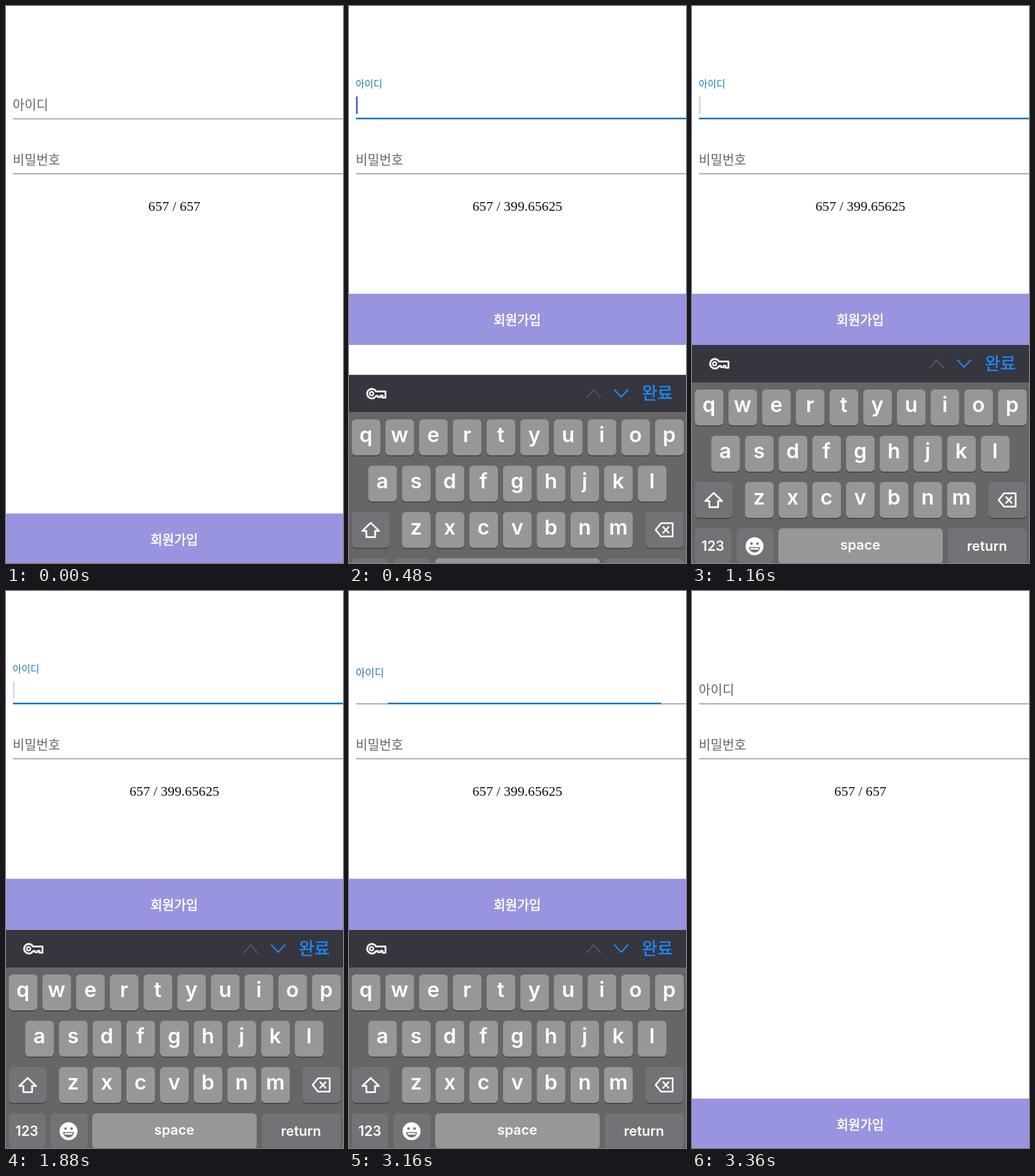
These frames come from a looping animation (582x963 px, 4.04 s). An HTML page with a canvas:

```html
<!DOCTYPE html>
<html lang="ko">
<head>
<meta charset="utf-8">
<style>
html, body { margin: 0; width: 100%; height: 100%; overflow: hidden; background: #fff; }
canvas { display: block; width: 582px; height: 963px; }
</style>
</head>
<body>
<canvas id="stage" width="582" height="963"></canvas>
<script>
const ctx = document.getElementById('stage').getContext('2d');
const LOOP = 4040;
const FOCUS = 226, BLUR = 3150;
const KEYBOARD_IN = 271.5, KEYBOARD_OUT = 3168.2;
const RESIZE_UP = 345, RESIZE_DOWN = 3300;
const KEYBOARD_TOP = 586, KEYBOARD_TRAVEL = 491;
const KOREAN = '"Noto Sans CJK KR", "Noto Sans CJK", sans-serif';
const LATIN = 'Inter, sans-serif';
const KEY = '#99969a', DARK_KEY = '#747276', BACK = '#676568';

const clamp = v => Math.max(0, Math.min(1, v));
const mix = (a, b, p) => a + (b - a) * p;
const mixColor = (a, b, p) => `rgb(${a.map((v, i) => Math.round(mix(v, b[i], p)))})`;

// cubic-bezier(0, 0, .2, 1)
function easeOut(x) {
  x = clamp(x);
  let lo = 0, hi = 1;
  for (let i = 0; i < 24; i++) {
    const s = (lo + hi) / 2;
    if (0.6 * s * s * (1 - s) + s ** 3 < x) lo = s; else hi = s;
  }
  return lo * lo * (3 - 2 * lo);
}

// Critically damped spring, 0 to 1
function spring(ms) {
  const w = Math.max(0, ms) * Math.sqrt(1000 / 3) / 1000;
  return 1 - (1 + w) * Math.exp(-w);
}

function caretAlpha(ms) {
  const phase = (ms / 1000) % 1;
  if (phase < 0.537) return 1;
  if (phase < 0.65) return 0.75 - 0.25 * Math.floor((phase - 0.537) / 0.038);
  if (phase < 0.887) return 0;
  return 0.25 + 0.25 * Math.floor((phase - 0.887) / 0.038);
}

function rect(x, y, w, h, color) {
  ctx.fillStyle = color;
  ctx.fillRect(x, y, w, h);
}

function rounded(x, y, w, h, r, color) {
  ctx.fillStyle = color;
  ctx.beginPath();
  ctx.roundRect(x, y, w, h, r);
  ctx.fill();
}

function text(str, x, y, font, color, align = 'center') {
  ctx.font = font;
  ctx.fillStyle = color;
  ctx.textAlign = align;
  ctx.fillText(str, x, y);
}

// Medium weight, between the installed regular and bold
function mediumText(str, x, y, font, color) {
  text(str, x, y, font, color);
  ctx.strokeStyle = color;
  ctx.lineWidth = 0.7;
  ctx.strokeText(str, x, y);
}

function line(points, color, width, closed) {
  ctx.beginPath();
  points.forEach(([x, y]) => ctx.lineTo(x, y));
  if (closed) ctx.closePath();
  ctx.strokeStyle = color;
  ctx.lineWidth = width;
  ctx.lineJoin = ctx.lineCap = 'round';
  ctx.stroke();
}

function disc(x, y, r, color) {
  ctx.fillStyle = color;
  ctx.beginPath();
  ctx.arc(x, y, r, 0, Math.PI * 2);
  ctx.fill();
}

function key(x, y, w, color) {
  rounded(x, y + 2, w, 62, 7, '#49474a');
  rounded(x, y, w, 62, 7, color);
}

function letters(str, x, y) {
  [...str].forEach((ch, i) => {
    const left = x + i * 58.2;
    key(left, y, 49.5, KEY);
    text(ch, left + 24.5, y + 39, `600 36px ${LATIN}`, '#fff');
  });
}

function keyIcon(x, y) {
  const color = '#ededef';
  ctx.strokeStyle = color;
  ctx.lineWidth = 3.4;
  ctx.beginPath();
  ctx.arc(x + 10, y, 8.2, -0.5, 0.5, true);
  ctx.stroke();
  line([[x + 17.2, y - 3.8], [x + 33.5, y - 3.8], [x + 33.5, y + 7], [x + 28.5, y + 7],
    [x + 28.5, y + 3.5], [x + 25, y + 3.5], [x + 25, y + 6], [x + 20.5, y + 6],
    [x + 20.5, y + 3.8], [x + 17.2, y + 3.8]], color, 3.2);
  ctx.lineWidth = 2.8;
  ctx.beginPath();
  ctx.arc(x + 9.5, y, 3.2, 0, Math.PI * 2);
  ctx.stroke();
}

function smiley(x, y) {
  disc(x, y, 15.5, '#fff');
  disc(x - 5.2, y - 4.5, 2.2, DARK_KEY);
  disc(x + 5.2, y - 4.5, 2.2, DARK_KEY);
  ctx.beginPath();
  ctx.arc(x, y + 1.5, 9.5, 0, Math.PI);
  ctx.closePath();
  ctx.fill();
  rect(x - 7, y + 3.2, 14, 2.6, '#fff');
}

function drawKeyboard(top) {
  ctx.save();
  ctx.translate(0, top);
  rect(0, 0, 582, 65, '#36363e');
  rect(0, 65, 582, 420, BACK);

  keyIcon(29.5, 32.5);
  line([[410.5, 39.5], [422.5, 26], [434.5, 39.5]], '#57575c', 2);
  line([[458.5, 26], [470, 38.5], [481.5, 26]], '#1f87f5', 2.5);
  mediumText('완료', 532.5, 42.5, `29px ${KOREAN}`, '#1f87f5');

  letters('qwertyuiop', 4.7, 77);
  letters('asdfghjkl', 33.2, 157);
  letters('zxcvbnm', 91.4, 237);

  key(5, 237, 65, DARK_KEY);
  line([[37.5, 255.8], [52, 269.8], [45, 269.8], [45, 280.5], [30, 280.5], [30, 269.8], [23, 269.8]],
    '#fff', 3, true);
  key(512, 237, 65.5, DARK_KEY);
  line([[529.5, 268], [539, 256.5], [559, 256.5], [559, 279.5], [539, 279.5]], '#fff', 2.8, true);
  line([[542.5, 263], [552, 273]], '#fff', 2.8);
  line([[552, 263], [542.5, 273]], '#fff', 2.8);

  const label = `600 23.6px ${LATIN}`;
  key(5, 317, 63, DARK_KEY);
  text('123', 36, 356, label, '#fff');
  key(77, 317, 64, DARK_KEY);
  smiley(108, 348);
  key(149, 317, 284, KEY);
  text('space', 290.5, 354, label, '#fff');
  key(441.5, 317, 136.5, DARK_KEY);
  text('return', 509.5, 356, label, '#fff');
  ctx.restore();
}

function drawForm(t) {
  const active = t < BLUR ? easeOut((t - FOCUS) / 200) : 1 - easeOut((t - BLUR) / 200);
  const raised = t >= RESIZE_UP && t < RESIZE_DOWN;

  text('아이디', 11.5, mix(179, 140.8, active), `${mix(22.3, 16.7, active)}px ${KOREAN}`,
    mixColor([102, 102, 102], [28, 126, 170], active), 'left');
  rect(12, 194.3, 570, 1.6, '#949494');
  rect(303 - 291 * active, 193, 582 * active, 3, '#2a7cba');
  if (t >= FOCUS && t < BLUR) {
    ctx.globalAlpha = caretAlpha(t - FOCUS - 18 + 1000);
    rounded(12, 156, 3, 31, 1.5, '#5567c8');
    ctx.globalAlpha = 1;
  }

  text('비밀번호', 11.5, 273.5, `22.3px ${KOREAN}`, '#666', 'left');
  rect(12, 289.3, 570, 1.6, '#949494');
  text(raised ? '657 / 399.65625' : '657 / 657', 290.8, 354,
    '23.8px "Liberation Serif", serif', '#111');

  const top = raised ? 497.5 : 877.5;
  rect(0, top, 582, 88.5, '#9894df');
  mediumText('회원가입', 290.5, top + 53, `22.3px ${KOREAN}`, '#fff');
}

function draw() {
  const t = performance.now() % LOOP;
  rect(0, 0, 582, 963, '#fff');
  drawForm(t);
  const shown = spring(t - KEYBOARD_IN) - spring(t - KEYBOARD_OUT);
  const top = KEYBOARD_TOP + KEYBOARD_TRAVEL * (1 - shown);
  if (top < 963) drawKeyboard(top);
  requestAnimationFrame(draw);
}
draw();
</script>
</body>
</html>
```
